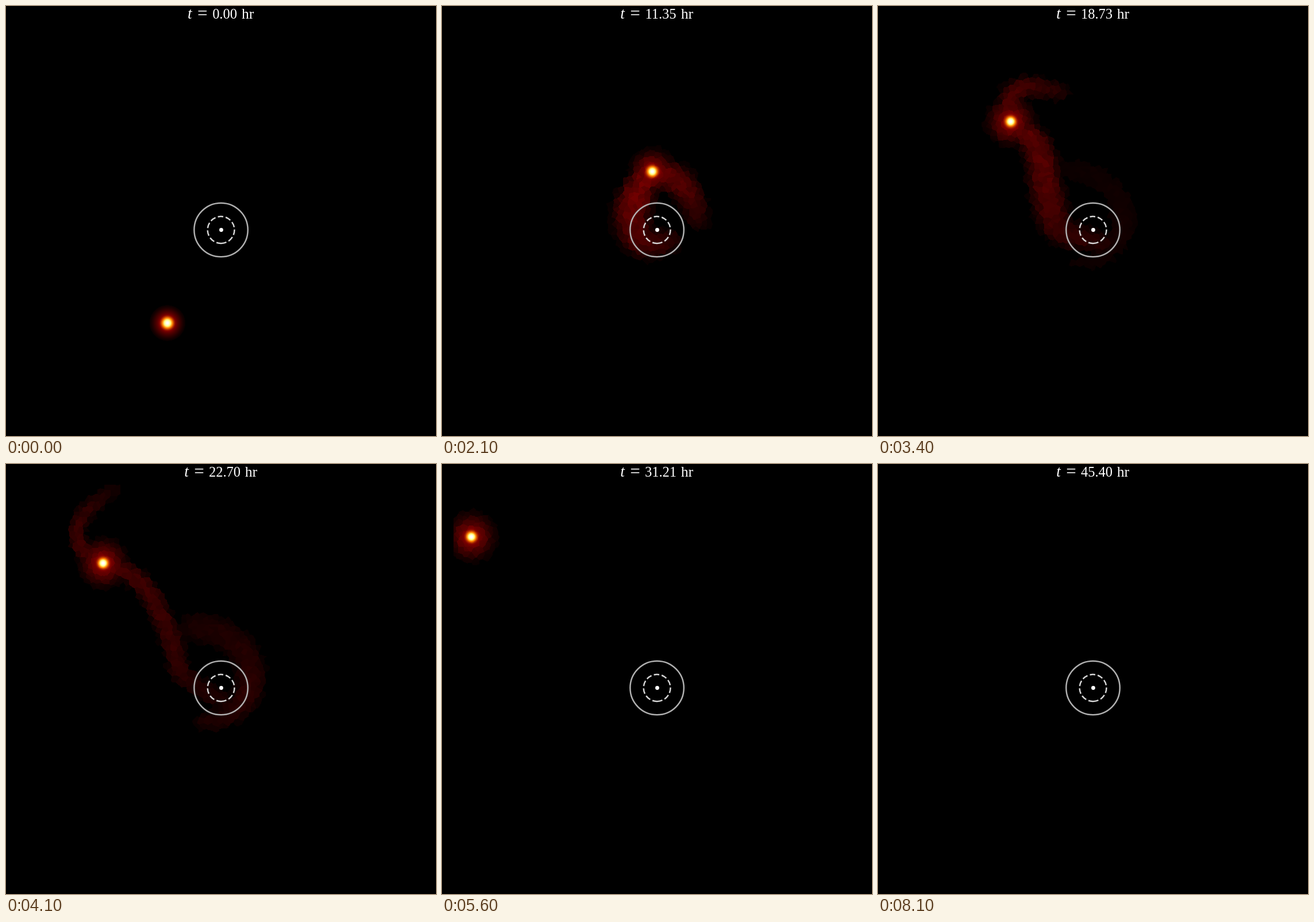
An HTML page with a canvas for the animation above (8.2 s loop, 748 px wide and 748 px high).

```html
<!DOCTYPE html>
<html lang="en">
<head>
<meta charset="utf-8">
<title>Tidal encounter</title>
<style>
  html, body { margin: 0; width: 100%; height: 100%; overflow: hidden; background: #000; }
  canvas, svg { position: absolute; left: 0; top: 0; width: 748px; height: 748px; }
  text { font: 24.4px "Liberation Serif", "Times New Roman", serif; fill: #fff; }
</style>
</head>
<body>
<canvas id="gas" width="748" height="748"></canvas>
<svg viewBox="0 0 748 748" fill="none">
  <circle cx="374" cy="389.5" r="46.7" stroke="#b0b0b0" stroke-width="2.5"/>
  <path d="M374 412.9a23.4 23.4 0 0 0 0-46.8a23.4 23.4 0 0 0 0 46.8"
        stroke="#d6d6d6" stroke-width="2.5" stroke-dasharray="9.63 4.17"/>
  <circle cx="374.4" cy="389.5" r="3.4" fill="#fff"/>
  <g id="left">
    <text x="316" y="22" style="font-style:italic;font-size:27px">t</text>
    <text x="333" y="23" style="font-size:31px">=</text>
  </g>
  <text id="hours" x="380.5" y="22" text-anchor="middle"></text>
  <text id="unit" x="410" y="22" style="font-size:25.5px">hr</text>
</svg>
<script>
const SIZE = 748, CELL = 9, CLIP_X = 20, CLIP_Y = 36;
const FOCUS_X = 374, FOCUS_Y = 389, PERI = 46.7;
const LAST_STEP = 80, HOURS_PER_STEP = 0.56752;
const ARM_START = 9, ARM_END = 55;

const clamp = (v, a = 0, b = 1) => Math.min(b, Math.max(a, v));
const mix = (a, b, u) => a + (b - a) * u;
const bump = (n, center, half) => clamp(1 - Math.abs(n - center) / half);

// Parabolic orbit: Barker's equation solved in closed form.
function starAt(n) {
  const mean = -3.472 + 0.2495 * n;
  const d = 2 * Math.sinh(Math.asinh(1.5 * mean) / 3);
  return [FOCUS_X + PERI * (1 - d * d), FOCUS_Y - 2 * PERI * d];
}

// Arm shapes: step, width, bulge, brightness, then points leading away from the star.
const inner = withEnds([
  [13, 16, 4, .17, 408, 382, 390, 367, 374, 364, 364, 372],
  [19, 20, 8, .21, 350, 322, 333, 365, 350, 410, 395, 408],
  [26, 14, 24, .21, 321, 290, 308, 365, 330, 415, 402, 405],
  [40, 16, 2, .12, 238, 208, 285, 300, 310, 370, 395, 420],
  [48, 12, 2, .065, 193, 185, 248, 262, 290, 345, 375, 435]
]);
const outer = withEnds([
  [13, 22, 3, .18, 423, 432, 425, 444, 425, 452],
  [19, 22, 2, .18, 415, 322, 437, 355, 442, 388],
  [26, 17, 6, .18, 342, 184, 395, 195, 460, 260],
  [40, 14, 0, .13, 126, 138, 133, 92, 182, 45],
  [48, 12, 0, .065, 45, 115, 37, 72, 55, 38]
]);

// An arm grows out of the star and finally fades while travelling along with it.
function withEnds(keys) {
  const last = keys[keys.length - 1], from = starAt(last[0]), to = starAt(ARM_END);
  const birth = starAt(ARM_START);
  const first = last.map((v, i) => i < 4 ? [ARM_START, 18, 0, 0.12][i] : birth[i % 2]);
  const end = last.map((v, i) => i < 4 ? v : v + to[i % 2] - from[i % 2]);
  end[0] = ARM_END;
  end[3] = 0;
  return [first, ...keys, end];
}

function spline(a, b, c, d, u) {
  return b + u / 2 * (c - a + u * (2 * a - 5 * b + 4 * c - d + u * (3 * (b - c) + d - a)));
}

// Shape between two keys, bent so that the arm stays attached to the curved orbit.
function armAt(keys, n, hold) {
  if (n < ARM_START || n >= ARM_END) return [];
  const k = keys.findIndex(key => key[0] > n);
  const a = keys[k - 1], b = keys[k], u = (n - a[0]) / (b[0] - a[0]);
  const now = starAt(n), s0 = starAt(a[0]), s1 = starAt(b[0]);
  const bend = now.map((v, i) => v - mix(s0[i], s1[i], u));
  const shape = a.map((v, i) => mix(v, b[i], u));
  const [, width, bulge, bright] = shape;
  const count = (shape.length - 4) / 2, knots = [now];
  for (let i = 0; i < count; i++) {
    const weight = mix(1, hold, (i + 1) / count);
    knots.push([0, 1].map(j => shape[4 + 2 * i + j] + bend[j] * weight));
  }
  const knot = i => knots[clamp(i, 0, count)];
  const chain = [], parts = count * 3;
  for (let i = 0; i <= parts; i++) {
    const s = i / parts, at = Math.min(count - 1, Math.floor(i / 3));
    const [x, y] = [0, 1].map(j =>
      spline(knot(at - 1)[j], knot(at)[j], knot(at + 1)[j], knot(at + 2)[j], i / 3 - at));
    chain.push([x, y, width + bulge * Math.sin(Math.PI * s), bright * (1 - 0.65 * s * s)]);
  }
  return chain;
}

// Gas spiralling around the focus.
function discAt(n) {
  const amount = bump(n, 40, n < 40 ? 13 : 8), chain = [];
  for (let i = 0; amount && i <= 10; i++) {
    const u = i / 10, angle = mix(-1.95, 2.05, u), r = 45 + 70 * (1 - u / 0.65) ** 2;
    chain.push([FOCUS_X + r * Math.cos(angle), FOCUS_Y + r * Math.sin(angle),
                26 - 10 * u * u, 0.085 * amount * (1 - 0.4 * Math.abs(2 * u - 1))]);
  }
  return chain;
}
function plumeAt(n) {
  const amount = bump(n, 13, 4);
  return amount ? [[400, 350, 13, 0.07 * amount], [428, 322, 9, 0.045 * amount]] : [];
}

function chainValue(chain, x, y) {
  let best = 0;
  for (let i = 1; i < chain.length; i++) {
    const a = chain[i - 1], b = chain[i];
    const dx = b[0] - a[0], dy = b[1] - a[1];
    const u = clamp(((x - a[0]) * dx + (y - a[1]) * dy) / (dx * dx + dy * dy || 1));
    const d = Math.hypot(x - a[0] - u * dx, y - a[1] - u * dy) / mix(a[2], b[2], u);
    if (d < 2) best = Math.max(best, mix(a[3], b[3], u) * Math.exp(-d * d * d));
  }
  return best;
}

// Irregular mesh: every pixel belongs to its nearest jittered site.
let seed = 7;
function random() {
  seed = (seed * 1664525 + 1013904223) >>> 0;
  return seed / 4294967296;
}
const COLS = Math.ceil(SIZE / CELL) + 2, COUNT = COLS * COLS;
const siteX = new Float32Array(COUNT), siteY = new Float32Array(COUNT), grain = new Float32Array(COUNT);
for (let i = 0; i < COUNT; i++) {
  siteX[i] = (i % COLS - 1 + random()) * CELL;
  siteY[i] = (Math.floor(i / COLS) - 1 + random()) * CELL;
  grain[i] = 0.86 + 0.28 * random();
}
const owner = new Uint16Array(SIZE * SIZE);
for (let y = 0; y < SIZE; y++) for (let x = 0; x < SIZE; x++) {
  const home = (Math.floor(y / CELL) + 1) * COLS + Math.floor(x / CELL) + 1;
  let nearest = Infinity;
  for (let j = -1; j <= 1; j++) for (let i = -1; i <= 1; i++) {
    const c = home + j * COLS + i;
    const d = (x - siteX[c]) ** 2 + (y - siteY[c]) ** 2;
    if (d < nearest) { nearest = d; owner[y * SIZE + x] = c; }
  }
}

const ctx = document.getElementById("gas").getContext("2d");
const image = ctx.createImageData(SIZE, SIZE);
const pixels = image.data;
const cells = new Float32Array(COUNT);

function drawGas(n) {
  const chains = [armAt(inner, n, 0), armAt(outer, n, 0.7), discAt(n), plumeAt(n)];
  for (let i = 0; i < COUNT; i++) {
    let v = 0;
    for (const chain of chains) v = Math.max(v, chainValue(chain, siteX[i], siteY[i]));
    cells[i] = v * grain[i];
  }
  const [sx, sy] = starAt(n), age = clamp(n / 26);
  const core = mix(9, 7.8, age), halo = mix(25, 33, age), glow = mix(0.2, 0.23, age);
  const rough = 0.75 * clamp((n - 5) / 12);
  for (let y = CLIP_Y; y < SIZE; y++) for (let x = CLIP_X; x < SIZE; x++) {
    const p = y * SIZE + x, c = owner[p];
    let v = cells[c];
    if (Math.abs(x - sx) < 60 && Math.abs(y - sy) < 60) {
      const r = Math.hypot(x - sx, y - sy) / core;
      const h = Math.hypot(mix(x, siteX[c], rough) - sx, mix(y, siteY[c], rough) - sy) / halo;
      v = Math.max(v, glow * Math.exp(-(h ** (4 - 1.4 * age)))) + 0.8 * Math.exp(-r * r);
    }
    if (v < 0.018) v = 0;
    pixels[p * 4] = 510 * v;
    pixels[p * 4 + 1] = 510 * v - 127;
    pixels[p * 4 + 2] = 510 * v - 255;
    pixels[p * 4 + 3] = 255;
  }
  ctx.putImageData(image, 0, 0);
}

const left = document.getElementById("left"), hours = document.getElementById("hours"),
      unit = document.getElementById("unit");
function drawStep(n) {
  const value = n * HOURS_PER_STEP, shift = value < 10 ? 0 : 5.8;
  hours.textContent = value.toFixed(2);
  left.setAttribute("transform", `translate(${-shift} 0)`);
  unit.setAttribute("transform", `translate(${shift} 0)`);
  drawGas(n);
}

let shown = -1;
const start = performance.now();
function tick() {
  const time = Math.max(0, performance.now() - start) % 8200;
  const step = clamp(Math.floor(time / 100) - 1, 0, LAST_STEP);
  if (step !== shown) drawStep(shown = step);
  requestAnimationFrame(tick);
}
tick();
</script>
</body>
</html>
```
